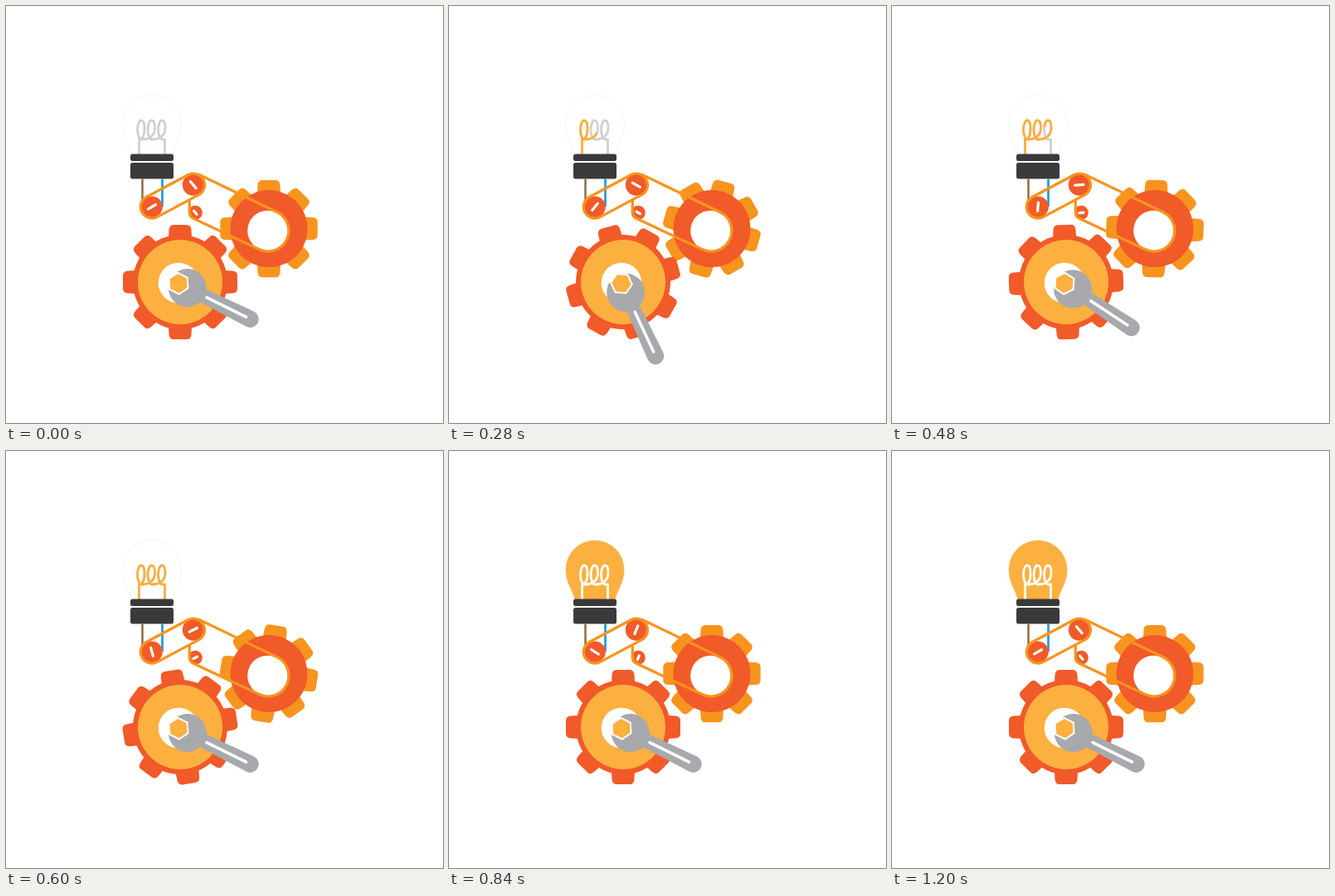
Write an HTML page that moves like this. It is 527 by 503 pixels and loops after 1.52 s.

```html
<!DOCTYPE html>
<html lang="en">
<head>
<meta charset="utf-8">
<title>Gears lighting a bulb</title>
<style>
  html, body { margin: 0; width: 100%; height: 100%; overflow: hidden; background: #fff; }
  svg { display: block; width: 100vw; height: 100vh; }
  .red { fill: #f15a29; }
  .orange { fill: #f7941e; }
  .dark { fill: #3a3a3c; }
  .steel { fill: #a7a9ac; }
  .belt { fill: none; stroke: #f7941e; stroke-width: 3.3; }
  .slot { stroke: #fff; stroke-linecap: round; }
  .coil { fill: none; stroke-width: 2.8; stroke-linejoin: round; }
</style>
</head>
<body>
<svg viewBox="0 0 527 503">
  <path id="bulb" stroke="#ececec" stroke-width=".6" d="M151.500 180C149 167 140.500 160 140.500 143A35.500 35.500 0 0 1 211.500 143C211.500 160 203 167 200.500 180Z"/>
  <path id="wire" class="coil"/>
  <path id="glow" class="coil" stroke="#fbb040" pathLength="1"/>
  <rect class="dark" x="150" y="178.500" width="52" height="8.500" rx="2.500"/>
  <rect class="dark" x="150" y="189" width="52" height="19.500" rx="2.500"/>
  <path d="M164.500 208.500V238" stroke="#8f6d3f" stroke-width="2.500"/>
  <path d="M188.500 208.500V242" stroke="#2a9bd8" stroke-width="2.800"/>

  <g transform="translate(317 268.600)">
    <g id="rightGear" class="orange"></g>
    <circle class="red" r="46.500"/>
    <circle cx="-1.500" cy="2.400" r="24.300" fill="#fff"/>
  </g>

  <g id="pulleys"></g>
  <path id="loop" class="belt"/>
  <path class="belt" d="M221.300 233V249Q222 254.500 226 256.300L305.300 293.600A25 25 0 0 0 326.700 248.400L232 203"/>

  <g transform="translate(210 333)">
    <g id="leftGear" class="red"></g>
    <circle class="red" r="57"/>
    <circle r="51" fill="#fbb040"/>
    <circle cx="-2" cy="1" r="24.300" fill="#fff"/>
  </g>

  <g id="wrench">
    <circle class="steel" cx="12" r="23"/>
    <path class="steel" d="M30-8.500L96.600-10.200A10.200 10.200 0 0 1 96.600 10.200L30 8.500Z"/>
    <path class="slot" d="M38 0H91" stroke-width="3.500"/>
    <path d="M-13-11.800H4V11.800H-13Z" fill="#fff"/>
    <path d="M12.800 0L6.400 11.100H-6.400L-12.800 0L-6.400-11.100H6.400Z" fill="#fbb040" stroke="#fff" stroke-width="2"/>
  </g>
</svg>
<script>
const $ = id => document.getElementById(id);
const set = (id, name, value) => $(id).setAttribute(name, value);
const ramp = (t, from, to) => Math.min(1, Math.max(0, (t - from) / (to - from)));

const REST = 26.4, SWING = 54;
const pulleys = [
  { x: 176, y: 242.3, r: 12.8, half: 5.2, angle: -30 },
  { x: 225.8, y: 215.8, r: 13, half: 5.2, angle: 50 },
  { x: 228.3, y: 249.3, r: 8.5, half: 2.6, angle: 50 }
];

// Filament: three coils between two upright leads
const coil = r => `c${r * .6} 0 ${r}-5 ${r}-14c0-6-1.7-9-4-9s-4.5 5-4.500 11s2 12 5 12`;
const filament = `M160.5 180V161${coil(6.5)}${coil(16)}${coil(16)}h3V180`;
set('wire', 'd', filament);
set('glow', 'd', filament);

// Belt around the two upper pulleys
function beltAround(a, b, r) {
  const length = Math.hypot(b.x - a.x, b.y - a.y);
  const nx = (b.y - a.y) / length * r, ny = (a.x - b.x) / length * r;
  return `M${a.x + nx} ${a.y + ny}L${b.x + nx} ${b.y + ny}A${r} ${r} 0 0 1 ${b.x - nx} ${b.y - ny}` +
    `L${a.x - nx} ${a.y - ny}A${r} ${r} 0 0 1 ${a.x + nx} ${a.y + ny}Z`;
}
set('loop', 'd', beltAround(pulleys[0], pulleys[1], 13.7));

function addTeeth(id, radius) {
  for (let i = 0; i < 8; i++)
    $(id).innerHTML += `<path transform="rotate(${i * 45})" d="M-14.500 ${24 - radius}L-13.500 ${6 - radius}Q-13-${radius}-8-${radius}H8Q13-${radius} 13.500 ${6 - radius}L14.500 ${24 - radius}Z"/>`;
}
addTeeth('rightGear', 58.7);
addTeeth('leftGear', 69);

$('pulleys').innerHTML = pulleys.map((p, i) =>
  `<g transform="translate(${p.x} ${p.y})"><circle class="red" r="${p.r}"/>` +
  `<path id="mark${i}" class="slot" stroke-width="3.2" d="M${-p.half} 0H${p.half}"/></g>`).join('');

function draw(t) {
  const lit = t >= 640;
  const pull = ramp(t, 0, 200) ** 2.4;
  const drive = 1 - (1 - ramp(t, 200, 560)) ** 1.35;
  const gear = lit ? 0 : SWING * drive;

  set('wrench', 'transform', `translate(208 334.7) rotate(${REST + SWING * (pull - drive)})`);
  set('leftGear', 'transform', `rotate(${-gear})`);
  set('rightGear', 'transform', `rotate(${gear})`);
  pulleys.forEach((p, i) =>
    set('mark' + i, 'transform', `rotate(${p.angle - 180 * ramp(t, 160, 1200)})`));

  set('bulb', 'fill', lit ? '#fbb040' : '#fff');
  set('wire', 'stroke', lit ? '#fff' : '#cfd0d1');
  const drawn = ramp(t, 70, 570);
  set('glow', 'stroke-dasharray', `${drawn} 2`);
  set('glow', 'visibility', drawn > 0 && !lit ? 'visible' : 'hidden');
}

// 25 poses per second, then a pause before the loop restarts
function tick() {
  const t = performance.now() % 1520;
  draw(Math.min(1200, Math.floor(t / 40) * 40));
  requestAnimationFrame(tick);
}
tick();
</script>
</body>
</html>
```
